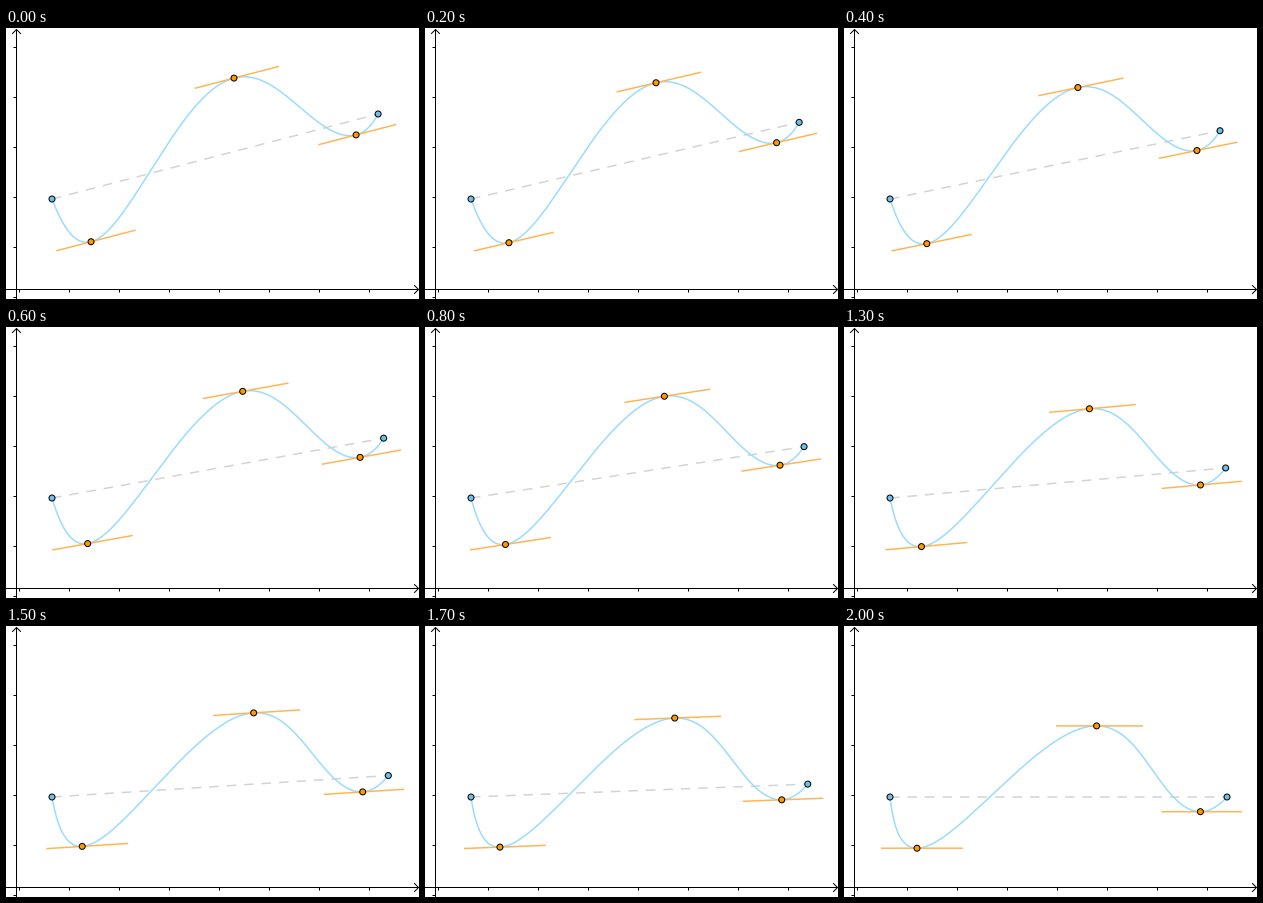
A matplotlib script for the animation above (2100 ms loop, 413 px wide and 271 px high).

```python
import numpy as np
import matplotlib.pyplot as plt
from matplotlib.animation import FuncAnimation
from matplotlib.patches import Circle

W, H, DPI = 413, 271, 64
FRAMES, STEP_MS = 21, 100
PX = 72 / DPI  # points per pixel

PIVOT = np.array([46.0, 171.0])
TILT = np.radians(14.61)
CHORD = 337.0
# Touch points relative to the pivot, with the chord lying flat (y up)
TOUCH = np.array([(27.0, -51.2), (206.6, 71.1), (310.4, -14.7)])
REACH = [(-36, 46), (-40.5, 46.5), (-39, 41.5)]  # tangent extents around each
SAG = 6.6e4  # narrows the crest without moving any touch point


def rotate(pts, angle):
    c, s = np.cos(angle), np.sin(angle)
    return np.atleast_2d(pts) @ np.array([[c, s], [-s, c]])


def place(pts, angle):
    """Turn points about the pivot and return stage x, y."""
    x, y = rotate(pts, angle).T
    return PIVOT[0] + x, PIVOT[1] - y


def polynomial_curve():
    """Polynomial through all five points, parallel to the chord at TOUCH."""
    ends = [(0, 0), (CHORD, 0)]
    pts = rotate(np.vstack([ends, TOUCH]), TILT)
    span = pts[1, 0]
    u, v = pts[:, 0] / span, pts[:, 1]
    n = np.arange(8)
    values = u[:, None] ** n
    slopes = n * u[2:, None] ** np.maximum(n - 1, 0)
    rhs = np.concatenate([v, np.full(3, span * np.tan(TILT))])
    coef = np.linalg.solve(np.vstack([values, slopes]), rhs)
    t = np.linspace(0, 1, 400)
    y = (t[:, None] ** n) @ coef
    touch = np.prod((t[:, None] - u[2:]) ** 2, axis=1)
    y -= SAG * t * (1 - t) * (t - 0.25) * touch
    return rotate(np.column_stack([t * span, y]), -TILT)


CURVE = polynomial_curve()
ENDS = np.array([(0, 0), (CHORD, 0)])
TANGENTS = [np.array([(x + a, y), (x + b, y)])
            for (x, y), (a, b) in zip(TOUCH, REACH)]

fig = plt.figure(figsize=(W / DPI, H / DPI), dpi=DPI, facecolor="white")
ax = fig.add_axes([0, 0, 1, 1])
ax.set_xlim(0, W)
ax.set_ylim(H, 0)
ax.axis("off")


def stroke(x, y, color, width, **kw):
    return ax.plot(x, y, color=color, lw=width * PX, snap=False, **kw)[0]


def dots(color, count):
    return [ax.add_patch(Circle((0, 0), 3, fc=color, ec="black", lw=PX,
                                zorder=5)) for _ in range(count)]


def move_dots(group, pts, angle):
    for dot, centre in zip(group, zip(*place(pts, angle))):
        dot.center = centre


def draw_axes():
    ox, oy = 10.5, 261.5
    black = dict(color="black", width=1, zorder=1)
    stroke([0, W - 0.5], [oy, oy], solid_capstyle="butt", **black)
    stroke([ox, ox], [1.5, H], solid_capstyle="butt", **black)
    stroke([408.5, 412.5, 408.5], [oy - 4, oy, oy + 4], **black)
    stroke([ox - 4, ox, ox + 4], [5.5, 1.5, 5.5], **black)
    for x in np.arange(13.5, 400, 50):
        stroke([x, x], [oy, oy + 3], solid_capstyle="butt", **black)
    for y in np.arange(19.5, H, 50):
        stroke([ox - 3, ox], [y, y], solid_capstyle="butt", **black)


draw_axes()
chord = stroke([], [], "#d3d3d3", 1.5, zorder=2, dash_capstyle="butt")
chord.set_dashes([9.5 / 1.5, 8 / 1.5])
curve = stroke([], [], "#99dcff", 1.5, zorder=3)
tangents = [stroke([], [], "#ffb554", 1.5, zorder=4, solid_capstyle="butt")
            for _ in TANGENTS]
end_dots = dots("#6cc0ea", len(ENDS))
touch_dots = dots("#ff9900", len(TOUCH))


def update(i):
    angle = TILT * (1 - i / (FRAMES - 1))
    chord.set_data(*place(ENDS, angle))
    curve.set_data(*place(CURVE, angle))
    for line, pts in zip(tangents, TANGENTS):
        line.set_data(*place(pts, angle))
    move_dots(end_dots, ENDS, angle)
    move_dots(touch_dots, TOUCH, angle)
    return [chord, curve, *tangents, *end_dots, *touch_dots]


anim = FuncAnimation(fig, update, frames=FRAMES, interval=STEP_MS,
                     repeat=True, repeat_delay=0, blit=False)
plt.show()
```
